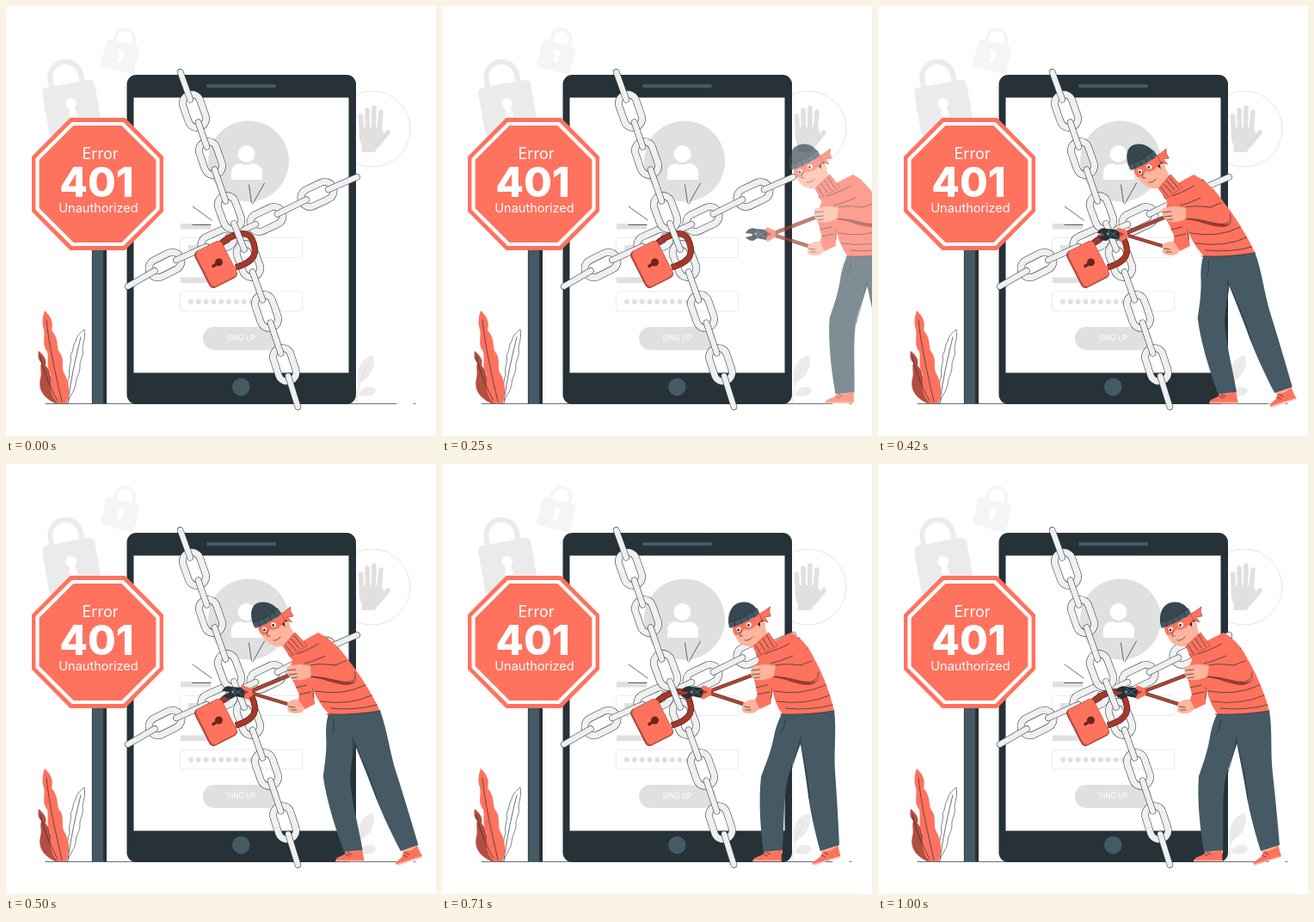
An HTML page that plays this animation: 500x500 px, repeating every 1040 ms.

```html
<!DOCTYPE html>
<html lang="en">
<head>
<meta charset="utf-8">
<title>Error 401</title>
<style>
  html, body { margin: 0; width: 100%; height: 100%; overflow: hidden; background: #fff; }
  svg { display: block; width: 100vw; height: 100vh; }
  text { font-family: Inter, "Open Sans", sans-serif; text-anchor: middle; fill: #fff; }
  .coral { fill: #ff725e; }
  .navy { fill: #263238; }
  .slate { fill: #455a64; }
  .skin { fill: #ffb49b; }
  .grey { fill: #e0e0e0; }
  .white { fill: #fff; }
  .line { fill: none; stroke: #263238; stroke-width: .7; stroke-linecap: round; stroke-linejoin: round; }
  .thin { stroke: #263238; stroke-width: .6; stroke-linejoin: round; }
  .field { fill: #fff; stroke: #ebebeb; stroke-width: 1; }
</style>
</head>
<body>
<svg viewBox="0 0 500 500">
  <!-- pale padlocks -->
  <g fill="#f5f5f5" transform="translate(133 58.500) rotate(15)">
    <path d="M-11-15V-21A11 11 0 0 1 11-21V-15" fill="none" stroke="#f5f5f5" stroke-width="4"/>
    <rect x="-20" y="-16" width="40" height="33" rx="4"/>
    <path class="white" d="M-2 0A4 4 0 1 1 2 0L3 7H-3Z"/>
  </g>
  <g fill="#ebebeb" transform="translate(76.500 118) rotate(-10)">
    <path d="M-19-25V-36A18 18 0 0 1 17-36V-25" fill="none" stroke="#ebebeb" stroke-width="6"/>
    <rect x="-31" y="-28" width="62" height="58" rx="6"/>
    <path class="white" d="M-3 1A6.5 6.5 0 1 1 3 1L5 11H-5Z"/>
  </g>

  <!-- stop hand -->
  <circle cx="426" cy="143" r="44" fill="#fff" stroke="#e6e6e6"/>
  <g class="grey">
    <path d="M411 141H437L440 150Q439 161 431 166L429 170H413L414 163Q409 154 411 141Z"/>
    <path d="M413.500 146L412.500 128M420.500 146L420 121M427.500 146L428 118M434 146L436 123M435 158L444 147" fill="none" stroke="#e0e0e0" stroke-width="5.500" stroke-linecap="round"/>
  </g>

  <!-- pale plant -->
  <g fill="#ebebeb">
    <path d="M409 440C407 424 412 409 427 406C431 418 424 432 411 438Z"/>
    <path d="M410 452C413 443 425 439 430 447C428 454 419 455 410 452Z"/>
    <path d="M408 462C408 450 409 439 420 419" fill="none" stroke="#e0e0e0"/>
  </g>

  <path class="line" d="M46 462.500H454M474 462.500H476"/>

  <!-- tablet -->
  <rect class="navy" x="140.500" y="80" width="266.500" height="383" rx="11"/>
  <rect class="white" x="148.500" y="106.500" width="250" height="320"/>
  <rect class="slate" x="233" y="91" width="81" height="4" rx="2"/>
  <circle class="slate" cx="273.300" cy="443" r="10.300"/>
  <circle class="grey" cx="282" cy="180.500" r="47"/>
  <circle class="white" cx="279.500" cy="172" r="10"/>
  <path class="white" d="M262 202V194Q262 184 272 183Q279 186 287 183Q298 184 298 194V202Z"/>
  <path class="grey" d="M203 253H238V259.500H203ZM203 315.500H238V322H203Z"/>
  <rect class="field" x="202.500" y="269.500" width="142" height="23" rx="3"/>
  <rect class="field" x="202.500" y="332" width="142" height="23" rx="3"/>
  <rect class="grey" x="212" y="278" width="30" height="6"/>
  <g id="dots" class="grey"></g>
  <rect class="grey" x="229" y="373" width="89" height="27" rx="13.500"/>
  <text x="273.500" y="389" font-size="8.300">SING UP</text>
  <path class="line" d="M217 233L239 249M217 254.500H238M282.500 208L285.500 229M300.500 206L287 230"/>

  <g id="across"></g>
  <g id="rings"></g>
  <!-- shackle -->
  <g fill="none">
    <path id="shackle" d="M248 278C261 266 280 259 286 271C293 286 291 297 267 304" stroke="#70251c" stroke-width="7"/>
    <use href="#shackle"/>
    <path d="M248 278C261 266 280 259 286 271C293 286 291 297 267 304" stroke="#a4392b" stroke-width="5.800"/>
  </g>
  <g id="bars"></g>

  <!-- red padlock -->
  <g transform="translate(244 300.500) rotate(-27)">
    <rect x="-17.500" y="-23.500" width="35" height="47" rx="5" fill="#c9503f" stroke="#7d281d" stroke-width=".7"/>
    <rect class="coral" x="-15.500" y="-23.500" width="33" height="46" rx="5"/>
  </g>
  <circle cx="247.500" cy="298" r="4.500" fill="#70251c"/>
  <path d="M247 298.500L241 302.500" stroke="#70251c" stroke-width="3.500" stroke-linecap="round"/>

  <!-- road sign -->
  <rect class="slate" x="100" y="280" width="17" height="182.500"/>
  <rect class="navy" x="113" y="280" width="4" height="182.500"/>
  <path class="line" d="M100.300 284V462"/>
  <path class="coral" d="M75 131H138L182 175.500V238.500L138 283H75L31 238.500V175.500Z" stroke="#ff725e" stroke-width="2" stroke-linejoin="round"/>
  <path d="M77.500 137H135.500L176.500 178V236L135.500 277H77.500L36.500 236V178Z" fill="none" stroke="#fff" stroke-width="4.200" stroke-linejoin="round"/>
  <text x="109.500" y="178" font-size="18">Error</text>
  <text x="105.500" y="222" font-size="47.500" font-weight="800">401</text>
  <text x="107.500" y="240" font-size="14.500">Unauthorized</text>

  <!-- leaves -->
  <path d="M57 462C42 455 37 444 40 433C42 426 39 421 41 415C37 411 37 406 38 401C47 409 47 413 46 418C52 424 50 429 54 435C58 443 60 452 64 462Z" fill="#b44e41"/>
  <path class="white thin" d="M69 462C73 448 70 438 74 429C72 420 77 415 75 406C79 401 77 395 81 390C82 384 86 380 91 376C93 386 89 393 89 399C91 407 85 413 86 419C86 428 81 432 81 440C79 450 73 454 72 462Z"/>
  <path class="line" d="M72 460C75 437 81 408 87 385"/>
  <path class="coral" d="M60 462C48 448 53 438 52 428C46 420 50 411 48 402C41 393 46 385 44 376C41 368 43 360 45 354C54 363 55 369 53 377C61 386 59 394 61 401C69 410 64 418 67 426C74 437 75 452 70 462Z"/>
  <path class="line" d="M47 365C50 395 58 430 65 460M40 408C44 425 51 443 60 459" stroke="#7d281d"/>

  <!-- burglar -->
  <g id="man" opacity="0">
    <!-- shoes -->
    <path class="skin" d="M380 444H401V453H380ZM443 440L465 438L467 450L448 455Z"/>
    <path class="coral" d="M383 449Q390 453 400 448L400.500 462H367Q367 458 374 456Q380 454 383 449ZM449 450Q457 451 465 444L469 456L440 466Q435 467 437 463L445 457Z"/>
    <path d="M367 461.500H400.500M437 466L469 456.500" fill="none" stroke="#ffc0b5" stroke-width="1.500"/>
    <path class="line" d="M380 454L384 456M383 452L387 454M447 455L451 457M450 452L454 454"/>
    <!-- legs -->
    <path class="slate" d="M400 288L455 286C459 312 456 335 459 360C462 388 465 418 467 443L445 450C437 425 431 400 428 382C424 358 420 340 417 322L400 300Z"/>
    <path class="slate" d="M395 289L428 289L418 324C412 342 405 357 403 372C400 395 402 423 401 449L379 451C374 421 371 389 373 363C379 346 384 331 386 317C388 305 391 297 395 289Z"/>
    <path class="line" d="M417 318C415 333 409 350 404 369M417 322C422 345 428 365 430 389M399 297Q398 307 394 314"/>

    <!-- far arm -->
    <path class="coral" d="M366 226C360 238 359 247 362 256L365 268L362 276L368 285L381 279C382 266 383 252 382 239Z"/>
    <path class="line" d="M362 251L373 248M363 260L376 257M365 268L379 265M379 240Q384 255 381 272"/>
    <!-- cutters -->
    <g fill="none" stroke-linecap="round" stroke-linejoin="round">
      <path d="M302 267L357 246M302 264L352 280" stroke="#6d2a22" stroke-width="4.400"/>
      <path d="M302 267L357 246M302 264L352 280" stroke="#a4473a" stroke-width="3.200"/>
      <path d="M302 260L309 263M302 271L309 267" stroke="#ff725e" stroke-width="5"/>
    </g>
    <path class="navy" d="M276 264C279 259 284 257 288 259L299 260L302 264L300 272L290 270L285 273C281 273 278 271 276 269L284 267V265Z"/>
    <path d="M289 261L299 269M289 269L299 262" stroke="#607d8b" stroke-width=".8"/>
    <circle cx="288.500" cy="265" r="1.700" fill="#78909c"/>
    <!-- lower hand -->
    <path class="skin" d="M363 274L368 285L363 289Q356 291 350 289Q346 286 349 282Q347 278 352 276Q358 273 363 274Z"/>
    <path class="line" d="M350 282L357 283M352 286L358 286" stroke="#b8715f"/>

    <!-- torso -->
    <path class="coral" d="M361 221C372 211 387 203 402 196C416 204 424 215 431 229C441 246 450 268 455 287Q425 292 395 291C387 281 383 268 380 253C377 244 369 233 361 221Z"/>
    <path class="line" d="M372 221Q393 214 412 202M379 232Q402 226 422 214M384 264Q416 270 444 257M388 276Q421 281 449 269M398 284Q427 287 453 280M392 291Q425 292 455 287" stroke="#7d281d"/>
    <!-- head -->
    <path class="skin" d="M335 190C335 203 342 211 352 212C357 213 360 211 364 208L377 207L366 175Z"/>
    <path class="coral" d="M358 212L375 196L386 211L364 224Z" stroke="#a4392b" stroke-width=".6" stroke-linejoin="round"/>
    <path class="line" d="M361 211L367 221M365 207L372 217M369 203L376 214M373 199L381 212" stroke="#a4392b"/>
    <path class="navy" d="M357 177L367 174L370 187L366 191Q363 186 358 185Z"/>
    <path class="skin" d="M365 184Q371 181 371 187Q370 193 365 192Z"/>
    <path class="coral" d="M333 189Q348 184 365 174L369 180Q362 186 358 190Q352 194 347 192Q342 200 336 199Q333 195 333 189Z"/>
    <path class="coral" d="M364 174L369 171L376 166L375 171L377 177L370 178L374 184L366 181Z" stroke="#a4392b" stroke-width=".6" stroke-linejoin="round"/>
    <ellipse class="white" cx="340.500" cy="192.500" rx="2.600" ry="2.800"/>
    <ellipse class="white" cx="352" cy="187" rx="3" ry="2.800"/>
    <circle class="navy" cx="340" cy="193" r="1.400"/>
    <circle class="navy" cx="351.500" cy="187.500" r="1.400"/>
    <path class="line" d="M343 193Q342 197 342 200L345 200M348 205Q353 206 357 201"/>
    <path d="M329 189C326 178 329 165 339 161.500C349 158 359 163 363 173Q348 182 329 190Z" fill="#37474f"/>
    <path class="slate" d="M328.500 184Q346 180 361 168L364 174Q348 185 330 191Z"/>
    <path class="line" d="M329 184Q346 180 361 168M335 183L336 189M342 181L344 186M349 177L351 182M356 173L358 178"/>

    <!-- near arm -->
    <path d="M382 248C397 249 412 258 425 257Q434 255 436 249L432 235L412 240Z" fill="#a4392b"/>
    <path class="coral" d="M402 199C416 202 425 219 434 239Q440 253 427 254C414 254 400 248 383 247L385 234C394 232 402 233 413 234L399 215Z"/>
    <path class="line" d="M385 234C394 232 404 233 414 234M383 247Q400 248 417 253Q436 256 435 242M414 234Q421 231 427 229" stroke="#7d281d"/>
    <path class="skin" d="M385 235L383 247Q374 252 366 251Q360 252 359 248Q355 245 357 240Q355 235 361 235Q372 231 385 235Z"/>
    <path class="line" d="M357 240L367 239M358 245L367 244M360 249L367 248" stroke="#b8715f"/>
  </g>
</svg>
<script>
const $ = id => document.getElementById(id);

$('dots').innerHTML = Array.from({ length: 9 }, (_, i) =>
  `<circle cx="${215 + i * 8.8}" cy="344" r="3"/>`).join('');

// Dark line below, lighter and slimmer line above: an outlined tube.
const tube = (shape, width) =>
  [['#37474f', width], ['#f0f0f0', width - 1.2]].map(([color, w]) =>
    `<g fill="none" stroke="${color}" stroke-width="${w}" stroke-linecap="round">${shape}</g>`).join('');

// First and last points are the loose ends, the others are link centres.
function chain(points) {
  let rings = '', bars = '';
  for (let i = 0; i + 1 < points.length; i++) {
    const [x, y] = points[i], [u, v] = points[i + 1];
    const d = Math.hypot(u - x, v - y), cx = (u - x) / d, cy = (v - y) / d;
    const a = i ? 14 : 2, b = i + 2 < points.length ? 14 : 2;
    bars += tube(`<path d="M${x + cx * a} ${y + cy * a}L${u - cx * b} ${v - cy * b}"/>`, 7.5);
    if (i) {
      const [px, py] = points[i - 1];
      const turn = Math.atan2(v - py, u - px) * 180 / Math.PI;
      rings += `<g transform="translate(${x} ${y}) rotate(${turn})">` +
        tube('<rect x="-20" y="-10.5" width="40" height="21" rx="10.5"/>', 8.5) + '</g>';
    }
  }
  return { rings, bars };
}

const across = chain([[140, 327], [185, 301], [246, 274], [303, 248], [362, 219], [410, 198]]);
const down = chain([[202, 75], [219, 122], [238, 177], [260, 240], [282, 296], [303, 355], [324, 417], [340, 468]]);
$('across').innerHTML = across.rings + across.bars;
$('rings').innerHTML = down.rings;
$('bars').innerHTML = down.bars;

// Cubic bezier (.36, -.01, .5, 1.38)
function ease(x) {
  const curve = (s, a, b) => 3 * a * s * (1 - s) ** 2 + 3 * b * s * s * (1 - s) + s ** 3;
  let lo = 0, hi = 1;
  for (let i = 0; i < 30; i++) {
    const mid = (lo + hi) / 2;
    if (curve(mid, .36, .5) < x) lo = mid; else hi = mid;
  }
  return curve(lo, -.01, 1.38);
}

const LOOP = 1040, FPS = 24, LEAD = 32, PIVOT = 314;
const stepStart = k => Math.round(k * 100 / FPS) * 10;

function pose(ms) {
  if (ms < 600) {
    const p = ease(ms / 600);
    return { x: 245 * (1 - p), skew: -20 + 30 * p, alpha: Math.max(0, Math.min(1, p)) };
  }
  if (ms < 800) return { x: 0, skew: 10 - 12 * ease((ms - 600) / 200), alpha: 1 };
  return { x: 0, skew: -2 + 2 * ease(Math.min(1, (ms - 800) / 200)), alpha: 1 };
}

function draw() {
  const t = performance.now() % LOOP;
  let k = FPS;
  while (stepStart(k) > t) k--;
  const { x, skew, alpha } = pose(k * 1000 / FPS + LEAD);
  $('man').setAttribute('opacity', alpha);
  $('man').setAttribute('transform', `translate(${x} ${PIVOT}) skewX(${skew}) translate(0 ${-PIVOT})`);
  requestAnimationFrame(draw);
}
draw();
</script>
</body>
</html>
```
